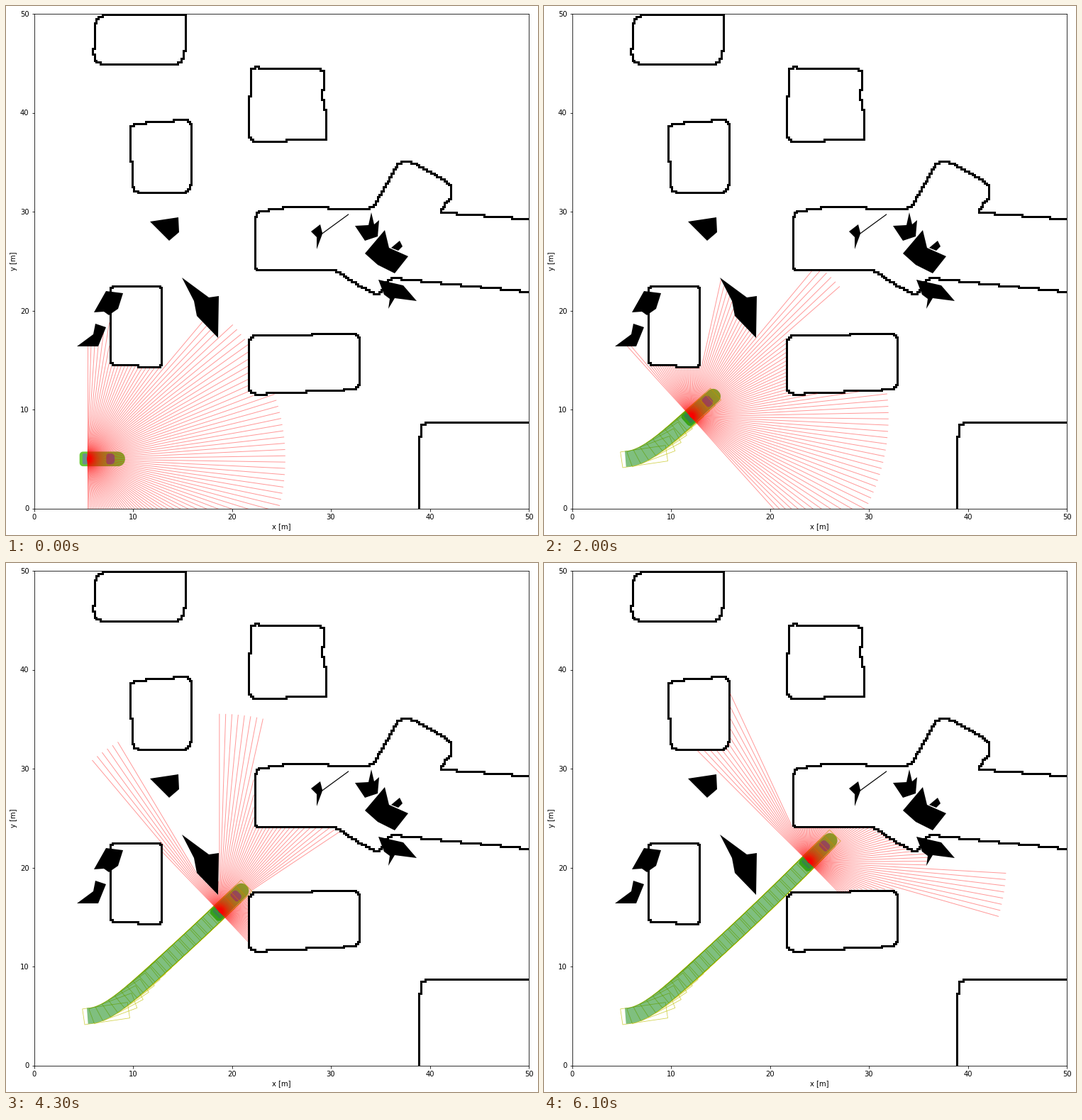
A matplotlib script that plays this animation: 750 px wide and 746 px high, repeating every 6.2 s.

```python
import numpy as np
import matplotlib.pyplot as plt
from matplotlib.animation import FuncAnimation
from matplotlib.collections import LineCollection, PolyCollection
from matplotlib.patches import Polygon
from matplotlib.path import Path
from matplotlib.transforms import Affine2D

W, H, DPI = 750, 746, 72
LEFT, TOP, SIDE = 39.5, 11, 697.5   # plot area in pixels
SPAN = 50                           # metres
SCALE = SIDE / SPAN
CELLS, FINE = 250, 4
CELL = SPAN / CELLS
FRAMES, STEP = 62, 0.4
RANGE, RAYS = 20, 100
WHEELBASE, HALF, OVERHANG = 3.0, 0.8, 0.8

fig = plt.figure(figsize=(W / DPI, H / DPI), dpi=DPI, facecolor="white")
ax = fig.add_axes([LEFT / W, 1 - (TOP + SIDE) / H, SIDE / W, SIDE / H])
ax.set(xlim=(0, SPAN), ylim=(0, SPAN), xlabel="x [m]", ylabel="y [m]")

grid = np.zeros((CELLS, CELLS), bool)   # row 0 is y = 0


def to_m(points):
    """Stage pixels to metres."""
    p = np.array(points, float)
    return np.column_stack([(p[:, 0] - LEFT) / SCALE,
                            SPAN - (p[:, 1] - TOP) / SCALE])


def round_corners(p, r):
    """Polyline whose inner corners become short quadratic curves."""
    t = np.linspace(0, 1, 12)[:, None]
    out = [p[:1]]
    for a, b, c in zip(p[:-2], p[1:-1], p[2:]):
        start, end = (b + (q - b) * min(0.5, r / np.hypot(*(q - b)))
                      for q in (a, c))
        out.append((1 - t) ** 2 * start + 2 * t * (1 - t) * b + t ** 2 * end)
    return np.vstack(out + [p[-1:]])


def wall(*points, r=10, closed=False):
    """Stair-stepped wall along a rounded polyline given in pixels."""
    p = to_m(points)
    if closed:
        middle = (p[:1] + p[-1:]) / 2
        p = np.vstack([middle, p, middle])
    p = round_corners(p, r / SCALE)
    dense = np.vstack([np.linspace(a, b, 400) for a, b in zip(p, p[1:])])
    cells = np.floor(dense / CELL).astype(int).clip(0, CELLS - 1)
    path = [cells[0]]
    for cell in cells[1:]:
        if (cell != path[-1]).all():
            path.append(np.array([cell[0], path[-1][1]]))
        if (cell != path[-1]).any():
            path.append(cell)
    path = np.array(path)
    grid[path[:, 1], path[:, 0]] = True
    ax.plot(*((path + 0.5) * CELL).T, color="black", lw=3, zorder=0.5,
            solid_joinstyle="miter", solid_capstyle="projecting")


wall((253, 12), (126, 12), (122, 82), (251, 82), (253, 12), r=18)
wall((173, 166), (262, 160), (260, 263), (179, 264), r=14, closed=True)
wall((452, 188), (343, 191), (344, 86), (449, 89), (446, 130), (452, 156),
     (452, 188), r=9)
wall((737, 300), (609, 291), (628, 269), (627, 250), (571, 219), (554, 219),
     (516, 286), (400, 283), (352, 290), (349, 372), (465, 372), (490, 390),
     (526, 408), (540, 383), (737, 403))
wall((146, 395), (220, 395), (220, 509), (147, 506), closed=True)
wall((341, 464), (400, 466), (440, 462), (499, 461), (499, 540), (341, 548),
     r=16, closed=True)
wall((583, 709), (581, 640), (585, 588), (737, 586), r=8)
wall((40, 12), (40, 12))

# Obstacles also stop the rays, so they go into a finer copy of the grid
solid = grid.repeat(FINE, 0).repeat(FINE, 1)
mid = (np.arange(CELLS * FINE) + 0.5) * CELL / FINE
centres = np.column_stack([m.ravel() for m in np.meshgrid(mid, mid)])


def obstacle(*points):
    p = to_m(points)
    ax.add_patch(Polygon(p, fc="black", ec="none", zorder=4))
    solid[Path(p).contains_points(centres).reshape(solid.shape)] = True


obstacle((203, 304), (243, 298), (244, 319), (230, 331))
obstacle((248, 383), (286, 411), (300, 409), (299, 468), (269, 437),
         (265, 416))
obstacle((141, 402), (165, 405), (158, 427), (145, 436), (138, 431),
         (124, 432))
obstacle((126, 448), (141, 453), (130, 480), (100, 480), (123, 463))
obstacle((430, 318), (443, 308), (446, 320), (483, 293), (483, 294.5),
         (446, 321.5), (438, 343), (438, 326))
obstacle((492, 310), (511, 309), (515, 291), (519, 308), (526, 302),
         (524, 325), (506, 331))
obstacle((534, 316), (540, 341), (567, 353), (548, 377), (524, 365),
         (506, 349))
obstacle((543, 341), (555, 331), (559, 339), (553, 345))
obstacle((525, 386), (560, 394), (579, 416), (548, 412), (539, 427),
         (541, 413), (533, 407))


def heading(n):
    """The turn eases out, then the course drifts slightly left."""
    limit = 42.6 + 0.07 * np.maximum(0, n - 28)
    return np.radians(limit * (1 - np.exp(-n / 4.6)))


steps = np.arange(FRAMES)
theta = heading(steps)
turn = heading(steps[:-1] + 0.5)
moves = STEP * np.column_stack([np.cos(turn), np.sin(turn)])
track = np.vstack([[0, 0], np.cumsum(moves, 0)]) + (5.4, 5)


def pose(n):
    return Affine2D().rotate(theta[n]).translate(*track[n])


def rounded(x0, x1, half, r_back, r_front):
    """Box along x with its own corner radius at each end."""
    points = []
    for x, s, r, start in ((x1 - r_front, 1, r_front, 0),
                           (x0 + r_back, 1, r_back, 90),
                           (x0 + r_back, -1, r_back, 180),
                           (x1 - r_front, -1, r_front, 270)):
        a = np.radians(np.linspace(start, start + 90, 9))
        points += list(zip(x + r * np.cos(a), s * (half - r) + r * np.sin(a)))
    return points


x_back, x_front = -OVERHANG, WHEELBASE + OVERHANG
box = np.array([(x_back, -HALF), (x_front, -HALF),
                (x_front, HALF), (x_back, HALF)])
footprints = [pose(n).transform(box) for n in range(1, FRAMES, 2)]

car = [
    Polygon(rounded(x_back, x_front, 0.74, 0.35, 0.7), fc="#69c936"),
    Polygon(rounded(-0.5, 0.0, 0.55, 0.15, 0.15), fc="#6c8f8c"),
    Polygon(rounded(1.9, 2.75, 0.54, 0.25, 0.35), fc="#5f7088"),
]
for part in car:
    part.set(edgecolor="none", zorder=1)
    ax.add_patch(part)

boxes = PolyCollection([], facecolors="none", edgecolors="y", linewidths=0.8,
                       alpha=0.7, zorder=1.5)
rays = LineCollection([], colors="red", linewidths=1, alpha=0.4, zorder=3)
ax.add_collection(boxes, autolim=False)
ax.add_collection(rays, autolim=False)
band, = ax.plot([], [], color="green", alpha=0.5, lw=2 * HALF * SCALE,
                solid_capstyle="butt", solid_joinstyle="round", zorder=2)

reach = np.arange(0, RANGE + 0.01, 0.04)
fan = np.linspace(-np.pi / 2, np.pi / 2, RAYS)


def scan(n):
    """Ray segments from the rear axle to the first hit."""
    a = theta[n] + fan
    aim = np.column_stack([np.cos(a), np.sin(a)])
    pts = track[n] + reach[None, :, None] * aim[:, None, :]
    ij = np.floor(pts * FINE / CELL).astype(int)
    inside = ((ij >= 0) & (ij < CELLS * FINE)).all(2)
    ij = ij.clip(0, CELLS * FINE - 1)
    hit = solid[ij[..., 1], ij[..., 0]] & inside
    dist = np.where(hit.any(1), reach[hit.argmax(1)], RANGE)
    ends = track[n] + dist[:, None] * aim
    return [(track[n], end) for end in ends]


def draw(n):
    for part in car:
        part.set_transform(pose(n) + ax.transData)
    boxes.set_verts(footprints[:(n + 1) // 2])
    band.set_data(track[:n + 1, 0], track[:n + 1, 1])
    rays.set_segments(scan(n))
    return [*car, boxes, band, rays]


ax.set(xlim=(0, SPAN), ylim=(0, SPAN))
anim = FuncAnimation(fig, draw, frames=FRAMES, interval=100, repeat=True,
                     init_func=lambda: draw(0))
plt.show()
```
